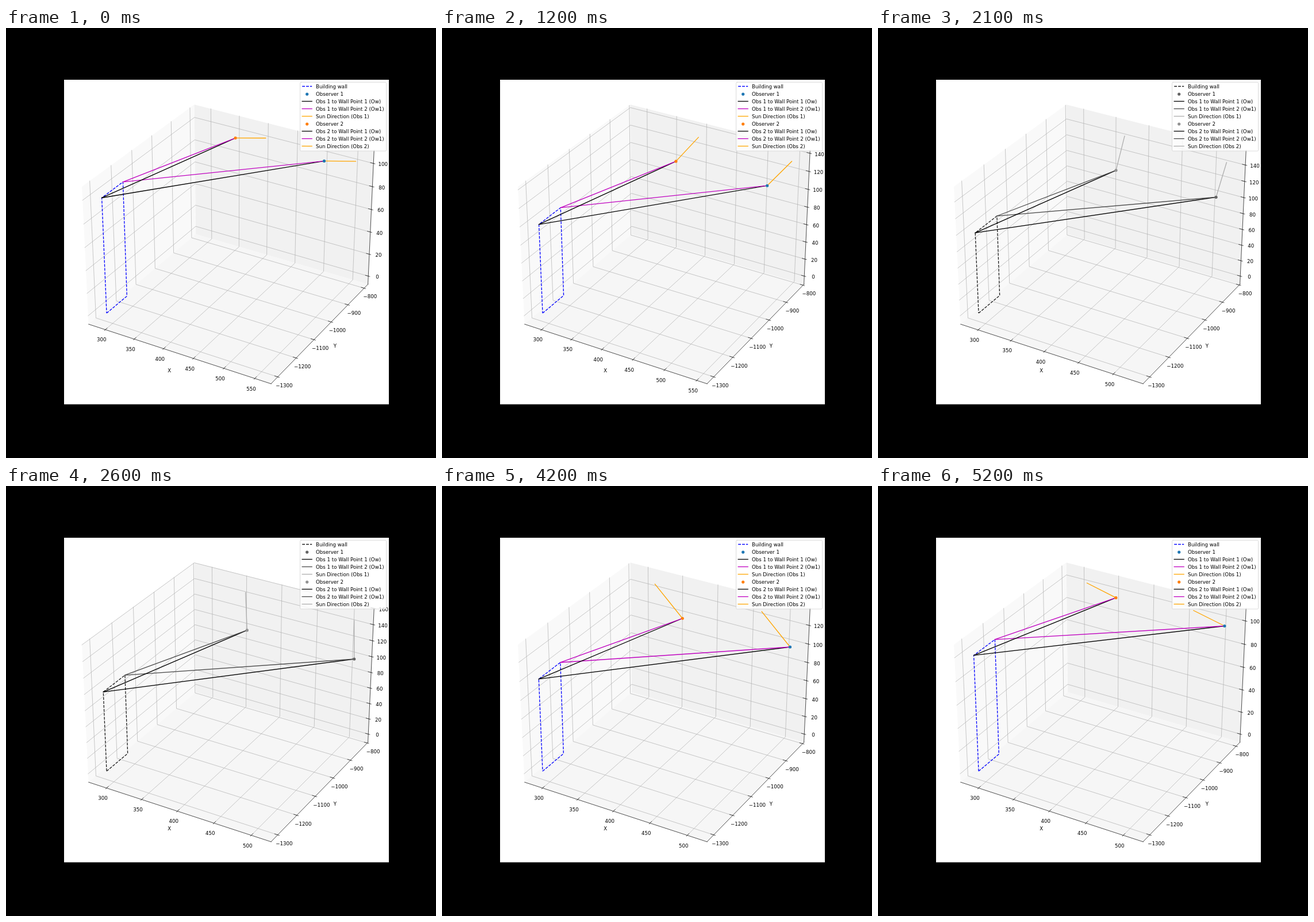
An HTML page with a canvas that plays this animation: 748x748 px, repeating every 5.3 s.

```html
<!DOCTYPE html>
<html lang="en">
<head>
<meta charset="utf-8">
<title>Sun direction over a building wall</title>
<style>
  html, body { margin: 0; width: 100%; height: 100%; overflow: hidden; background: #000; }
  canvas { display: block; width: 748px; height: 748px; }
</style>
</head>
<body>
<canvas id="plot" width="748" height="748"></canvas>
<script>
const ctx = document.getElementById('plot').getContext('2d');
const RAD = Math.PI / 180;
const PT = 0.8657;                       // pixels per point
const STEP = 100, STEPS = 53;

// Scene
const WALL = [[290, -1300], [290, -1200]];
const HEIGHT = 100, REACH = 50;
const OBSERVERS = [[510, -830, 100], [360, -830, 100]];
const LAT = 30 * RAD, DEC = 20.6 * RAD, NOON = 25.92, TURN = 3.75 * RAD;

// View box: half size of panes, span of the data, one twelfth of the box
const H = 0.595238, SPAN = 1.038961, DELTA = 0.0952381;
const TICK_STEP = [50, 100, 20];

const COLOR = { wall: '#0000ff', ow: '#000000', ow1: '#bf00bf', sun: '#ffa500', dots: ['#1f77b4', '#ff7f0e'] };
const GRAY = { wall: '#1d1d1d', ow: '#000000', ow1: '#4a4a4a', sun: '#adadad', dots: ['#646464', '#929292'] };

// Camera at elevation 30, azimuth -60, distance 10
function project([x, y, zn]) {
  const z = zn * 0.75;
  const k = 3054 / (10 - (0.4330127 * x - 0.75 * y + 0.5 * z));
  return [
    391.1 + k * (0.8660254 * x + 0.5 * y),
    364.4 - k * (-0.25 * x + 0.4330127 * y + 0.8660254 * z)
  ];
}

function sunVector(step) {
  const h = (step - NOON) * TURN;
  const flat = Math.cos(DEC) * Math.cos(h);
  return [
    -Math.cos(DEC) * Math.sin(h),
    Math.cos(LAT) * Math.sin(DEC) - Math.sin(LAT) * flat,
    Math.sin(LAT) * Math.sin(DEC) + Math.cos(LAT) * flat
  ].map(v => v * REACH);
}

function path(points, color, width, dash = []) {
  ctx.beginPath();
  points.forEach(([x, y]) => ctx.lineTo(x, y));
  ctx.strokeStyle = color;
  ctx.lineWidth = width * PT;
  ctx.setLineDash(dash);
  ctx.lineCap = dash.length ? 'butt' : 'square';
  ctx.lineJoin = 'round';
  ctx.stroke();
}

const path3 = (points, ...style) => path(points.map(project), ...style);
const DASH = [5.55 * PT, 2.4 * PT];

function dot(x, y, color) {
  ctx.beginPath();
  ctx.arc(x, y, 3 * PT, 0, 2 * Math.PI);
  ctx.fillStyle = color;
  ctx.fill();
}

function text(str, x, baseline, align = 'center') {
  ctx.font = 10 * PT + 'px "DejaVu Sans", sans-serif';
  ctx.textAlign = align;
  ctx.fillStyle = '#000';
  ctx.fillText(str, x, baseline);
}

function pane(points, color) {
  ctx.beginPath();
  points.forEach(p => ctx.lineTo(...project(p)));
  ctx.fillStyle = color;
  ctx.fill();
}

function drawPanes() {
  pane([[-H, -H, -H], [-H, H, -H], [-H, H, H], [-H, -H, H]], '#f9f9f9');
  pane([[-H, H, -H], [H, H, -H], [H, H, H], [-H, H, H]], '#f1f1f1');
  pane([[-H, -H, -H], [H, -H, -H], [H, H, -H], [-H, H, -H]], '#f6f6f6');
}

function ticksFor(axis, { mid, range }) {
  const reach = range * H / SPAN, step = TICK_STEP[axis], list = [];
  for (let v = Math.ceil((mid - reach) / step) * step; v <= mid + reach; v += step) {
    list.push({ v, n: (v - mid) / range * SPAN });
  }
  return list;
}

const GRID = [
  n => [[n, -H, -H], [n, H, -H], [n, H, H]],
  n => [[H, n, -H], [-H, n, -H], [-H, n, H]],
  n => [[H, H, n], [-H, H, n], [-H, -H, n]]
];
// A point on each axis, pushed outwards by a and along the tick by b
const EDGE = [
  (n, a = 0, b = 0) => [n, -H - a - b, -H - a],
  (n, a = 0, b = 0) => [H + a + b, n, -H - a],
  (n, a = 0, b = 0) => [H + a + b, H + a, n]
];

function drawAxes(limits) {
  const ticks = limits.map((l, i) => ticksFor(i, l));
  ticks.forEach((list, i) => list.forEach(t => path3(GRID[i](t.n), '#b0b0b0', 0.8)));
  ticks.forEach((list, i) => {
    const at = EDGE[i];
    path3([at(-H), at(H)], '#000', 0.8);
    for (const { v, n } of list) {
      path3([at(n, 0, 0.1 * DELTA), at(n, 0, -0.2 * DELTA)], '#000', 0.8);
      const [x, y] = project(at(n, 0.4229 * DELTA));
      text(String(v).replace('-', '\u2212'), x, y + 6.8);
    }
  });
  ['X', 'Y'].forEach((name, i) => {
    const [x, y] = project(EDGE[i](0, 0.9195 * DELTA));
    text(name, x, y + 3.2);
  });
}

function drawLegend(c) {
  ctx.beginPath();
  ctx.roundRect(511.6, 94.4, 150, 119.6, 1.8);
  ctx.fillStyle = 'rgba(255,255,255,0.8)';
  ctx.fill();
  ctx.strokeStyle = 'rgba(204,204,204,0.8)';
  ctx.lineWidth = PT;
  ctx.setLineDash([]);
  ctx.stroke();

  let y = 101.5;
  const row = (label, color, dash) => {
    if (label.startsWith('Observer')) dot(523.7, y + 0.6, color);
    else path([[515.2, y], [532.2, y]], color, 1.5, dash);
    text(label, 539, y + 3.2, 'left');
    y += 13;
  };
  row('Building wall', c.wall, DASH);
  for (const i of [1, 2]) {
    row(`Observer ${i}`, c.dots[i - 1]);
    row(`Obs ${i} to Wall Point 1 (Ow)`, c.ow);
    row(`Obs ${i} to Wall Point 2 (Ow1)`, c.ow1);
    row(`Sun Direction (Obs ${i})`, c.sun);
  }
}

function draw(step) {
  const c = step >= 15 && step < 30 ? GRAY : COLOR;
  const sun = sunVector(step);
  const tips = OBSERVERS.map(o => o.map((v, i) => v + sun[i]));
  const [low1, low2] = WALL.map(p => [...p, 0]);
  const [top1, top2] = WALL.map(p => [...p, HEIGHT]);

  const all = [low1, low2, top1, top2, ...OBSERVERS, ...tips];
  const limits = [0, 1, 2].map(i => {
    const vals = all.map(p => p[i]);
    const lo = Math.min(...vals), hi = Math.max(...vals);
    return { mid: (lo + hi) / 2, range: hi - lo };
  });
  const place = p => p.map((v, i) => (v - limits[i].mid) / limits[i].range * SPAN);
  const line = (points, color, dash) => path3(points.map(place), color, 1.5, dash);

  ctx.fillStyle = '#000';
  ctx.fillRect(0, 0, 748, 748);
  ctx.fillStyle = '#fff';
  ctx.fillRect(101, 90, 565, 564.6);

  drawPanes();
  drawAxes(limits);
  line([low1, low2, top2, top1, low1], c.wall, DASH);
  OBSERVERS.forEach((o, i) => {
    line([o, top1], c.ow);
    line([o, top2], c.ow1);
    line([o, tips[i]], c.sun);
  });
  OBSERVERS.forEach((o, i) => dot(...project(place(o)), c.dots[i]));
  drawLegend(c);
}

const start = performance.now();
let last = -1;
function tick() {
  const step = Math.floor((performance.now() - start) / STEP) % STEPS;
  if (step !== last) draw(last = step);
  requestAnimationFrame(tick);
}
tick();
</script>
</body>
</html>
```
